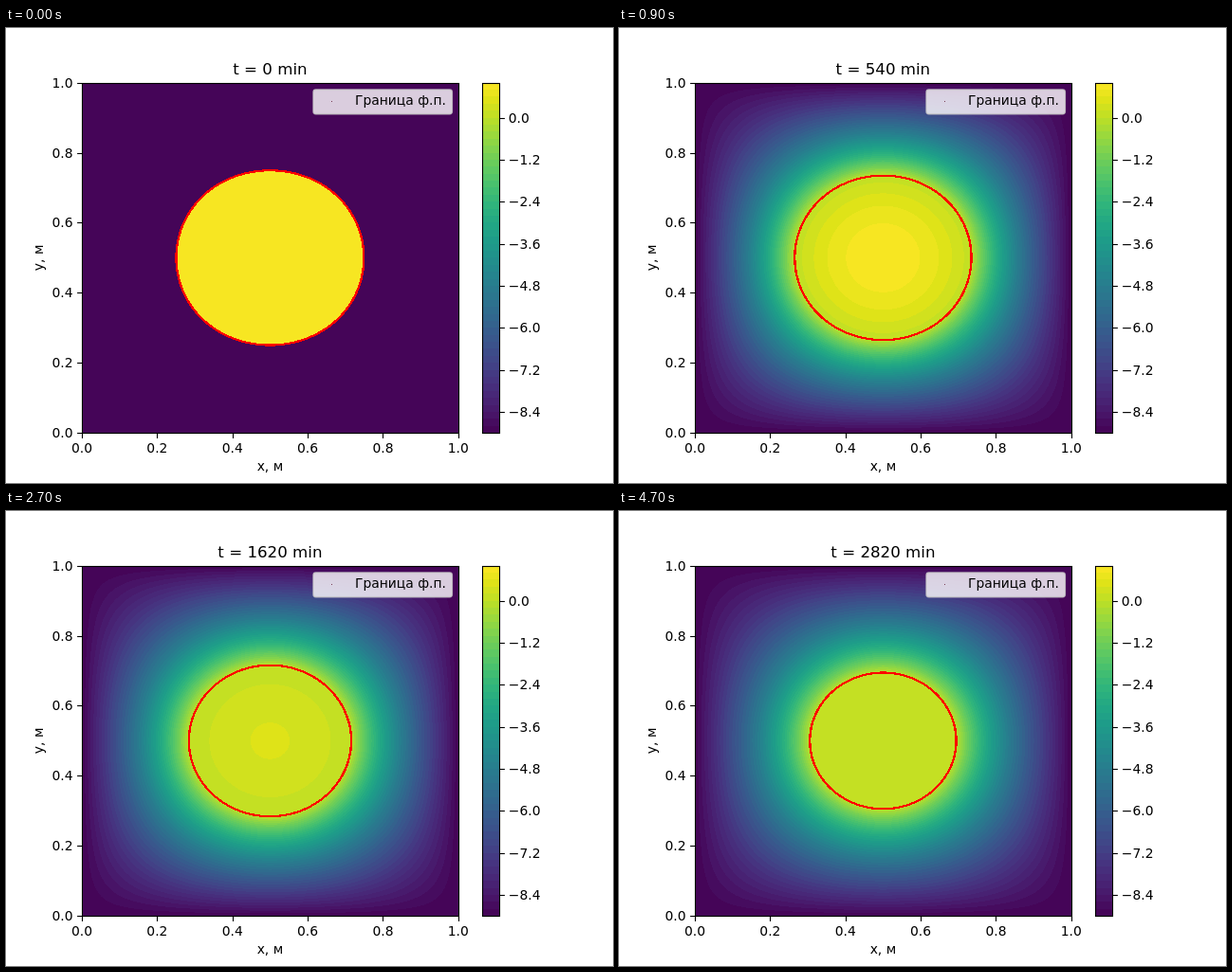
Animation of 640 by 480 pixels, one loop 4.8 s. Source, as an HTML page with a canvas:

```html
<!DOCTYPE html>
<html lang="ru">
<head>
<meta charset="utf-8">
<title>Freezing front</title>
<style>
  html, body { margin: 0; width: 100%; height: 100%; overflow: hidden; background: #fff; }
  canvas, svg { position: absolute; left: 0; top: 0; }
  canvas { left: 80px; top: 58px; }
  text { font: 13.89px "DejaVu Sans", sans-serif; fill: #000; }
  #title { font-size: 16.67px; }
  .line { fill: none; stroke: #000; stroke-width: 1.11; }
</style>
</head>
<body>
<canvas id="field" width="397" height="370"></canvas>
<svg id="plot" width="640" height="480" viewBox="0 0 640 480">
  <g id="bands" shape-rendering="crispEdges"></g>
  <g id="axes"></g>
  <rect class="line" x="80.5" y="58.5" width="397" height="369"/>
  <rect class="line" x="502.5" y="58.5" width="18" height="369"/>
  <text id="title" x="278.4" y="49" text-anchor="middle">t = 0 min</text>
  <text x="278.4" y="467" text-anchor="middle">x, м</text>
  <text transform="translate(39 242.4) rotate(-90)" text-anchor="middle">y, м</text>
  <rect x="324" y="65" width="146.4" height="25.8" rx="2.8" fill="#fff" fill-opacity=".8" stroke="#ccc" stroke-opacity=".8" stroke-width="1.39"/>
  <rect x="343" y="77" width="1" height="1" fill="#7a4058"/>
  <text x="368" y="81">Граница ф.п.</text>
</svg>
<script>
const LEFT = 80, TOP = 57.6, WIDTH = 396.8, HEIGHT = 369.6;
const FRAMES = 48, FRAME_MS = 100, FRAME_MIN = 60;
const T_MIN = -9, BANDS = 50, BAND_STEP = 0.2;

// Viridis, sampled every 5 %
const STOPS = ('440154 481467 482576 463480 414487 3b528b 355f8d 2f6c8e 2a788e 25848e 21918c ' +
  '1e9c89 22a884 2fb47c 44bf70 5ec962 7ad151 9bd93c bddf26 dfe318 fde725')
  .split(' ').map(hex => [0, 2, 4].map(i => parseInt(hex.slice(i, i + 2), 16)));

function viridis(u) {
  const p = u * (STOPS.length - 1), i = Math.min(Math.floor(p), STOPS.length - 2);
  return STOPS[i].map((a, c) => Math.round(a + (STOPS[i + 1][c] - a) * (p - i)));
}
const pack = ([r, g, b]) => (255 << 24 | b << 16 | g << 8 | r) >>> 0;
const colors = Array.from({ length: BANDS }, (_, i) => viridis((i + 0.5) / BANDS));
const packed = colors.map(pack);
const RED = pack([255, 0, 0]);

function bandColor(temp) {
  const i = Math.floor((temp - T_MIN) / BAND_STEP + 1e-9);
  return packed[Math.max(0, Math.min(BANDS - 1, i))];
}

// ---- Axes and colour bar ----
function add(parent, tag, attrs, content = '') {
  const el = document.createElementNS('http://www.w3.org/2000/svg', tag);
  for (const key in attrs) el.setAttribute(key, attrs[key]);
  el.textContent = content;
  document.getElementById(parent).append(el);
}
const snap = v => Math.round(v) + 0.5;
const tick = d => add('axes', 'path', { class: 'line', d });

for (let i = 0; i <= 5; i++) {
  const label = (i / 5).toFixed(1);
  const x = LEFT + WIDTH * i / 5, y = TOP + HEIGHT * (1 - i / 5);
  tick(`M${snap(x)} 427.5v5.4`);
  tick(`M80.5 ${snap(y)}h-5.4`);
  add('axes', 'text', { x, y: 448, 'text-anchor': 'middle' }, label);
  add('axes', 'text', { x: 70.5, y: Math.round(y + 5), 'text-anchor': 'end' }, label);
}
for (let i = 0; i < 8; i++) {
  const y = TOP + HEIGHT * (1 + 1.2 * i) / 10;
  tick(`M520.5 ${snap(y)}h5.4`);
  add('axes', 'text', { x: 529.8, y: Math.round(y + 5) }, (i ? '\u2212' : '') + (1.2 * i).toFixed(1));
}
colors.forEach((rgb, i) => {
  const y0 = Math.round(TOP + HEIGHT * (1 - (i + 1) / BANDS));
  const y1 = Math.round(TOP + HEIGHT * (1 - i / BANDS));
  add('bands', 'rect', { x: 502, y: y0, width: 18, height: y1 - y0, fill: `rgb(${rgb})` });
});

// ---- Map from the square plate to an equivalent disc ----
const DISC = 0.53935, LUT_SIZE = 8192;
const canvas = document.getElementById('field');
const ctx = canvas.getContext('2d');
const image = ctx.createImageData(canvas.width, canvas.height);
const pixels = new Uint32Array(image.data.buffer);
const lookup = new Uint16Array(pixels.length);

// Green's function of the square with its source in the centre
function green(x, y) {
  let sum = 0;
  const c = Math.cos(Math.PI * x);
  for (let k = -3; k <= 3; k++) {
    const ch = Math.cosh(Math.PI * (y + k));
    sum += (k % 2 ? -0.5 : 0.5) * Math.log((ch + c) / (ch - c));
  }
  return sum;
}
function discRadius(x, y) {
  const r = Math.hypot(x, y);
  if (r < 0.22) return r;
  const shift = Math.log(DISC / r) - green(x, y);
  return r * Math.exp(shift * (1 - (0.22 / r) ** 8));
}
for (let j = 0, p = 0; j < canvas.height; j++) {
  const y = (58.5 + j - TOP) / HEIGHT - 0.5;
  for (let i = 0; i < canvas.width; i++, p++) {
    const x = Math.min(0.5, (i + 0.5) / WIDTH - 0.5);
    lookup[p] = Math.min(LUT_SIZE - 1, discRadius(x, y) / DISC * LUT_SIZE);
  }
}

// ---- Radial heat flow on both sides of the moving front ----
const N = 50, DT = 4, D_WATER = 1.43e-7, D_ICE = 1.1e-6, T_FRONT = 0.07;
let water = new Float64Array(N + 1).fill(1);
let ice = new Float64Array(N + 1).fill(T_MIN);

const front = min => 0.2446 - 1.778e-5 * min + 0.0054 * Math.exp(-min / 45);

function advance(sec) {
  const r = front(sec / 60), drift = (front((sec + DT) / 60) - r) / DT / r;
  const span = Math.log(DISC / r), h = 1 / N, hi = span / N;
  const w = water.slice(), c = ice.slice(), kw = D_WATER / (r * r);
  water[N] = w[N] = T_FRONT;
  ice[0] = c[0] = 0;
  water[0] += DT * kw * 4 * (w[1] - w[0]) / (h * h);
  for (let i = 1; i < N; i++) {
    const s = i * h;
    let d1 = (w[i + 1] - w[i - 1]) / (2 * h);
    let d2 = (w[i + 1] - 2 * w[i] + w[i - 1]) / (h * h);
    water[i] += DT * (kw * (d2 + d1 / s) + s * drift * d1);
    d1 = (c[i + 1] - c[i - 1]) / (2 * hi);
    d2 = (c[i + 1] - 2 * c[i] + c[i - 1]) / (hi * hi);
    const rad = r * Math.exp(s * span);
    ice[i] += DT * (D_ICE / (rad * rad) * d2 + (1 - s) * drift * d1);
  }
}
function sample(profile, s) {
  const p = s * N, i = Math.min(N - 1, Math.floor(p));
  return profile[i] + (profile[i + 1] - profile[i]) * (p - i);
}
function palette(min) {
  const r0 = front(min), span = Math.log(DISC / r0);
  return Uint32Array.from({ length: LUT_SIZE }, (_, i) => {
    const r = (i + 0.5) / LUT_SIZE * DISC;
    if (Math.abs(r - r0) < 0.003) return RED;
    return bandColor(r < r0 ? sample(water, r / r0) : sample(ice, Math.log(r / r0) / span));
  });
}
const palettes = [];
for (let f = 0; f < FRAMES; f++) {
  palettes.push(palette(f * FRAME_MIN));
  for (let s = 0; s < FRAME_MIN * 60; s += DT) advance(f * FRAME_MIN * 60 + s);
}

// ---- Playback ----
const title = document.getElementById('title');
let shown = -1, start;

function draw(f) {
  const lut = palettes[f];
  for (let p = 0; p < pixels.length; p++) pixels[p] = lut[lookup[p]];
  ctx.putImageData(image, 0, 0);
  title.textContent = `t = ${f * FRAME_MIN} min`;
  shown = f;
}
function loop(now) {
  start ??= now;
  const f = Math.floor((now - start) / FRAME_MS) % FRAMES;
  if (f !== shown) draw(f);
  requestAnimationFrame(loop);
}
draw(0);
requestAnimationFrame(loop);
</script>
</body>
</html>
```
